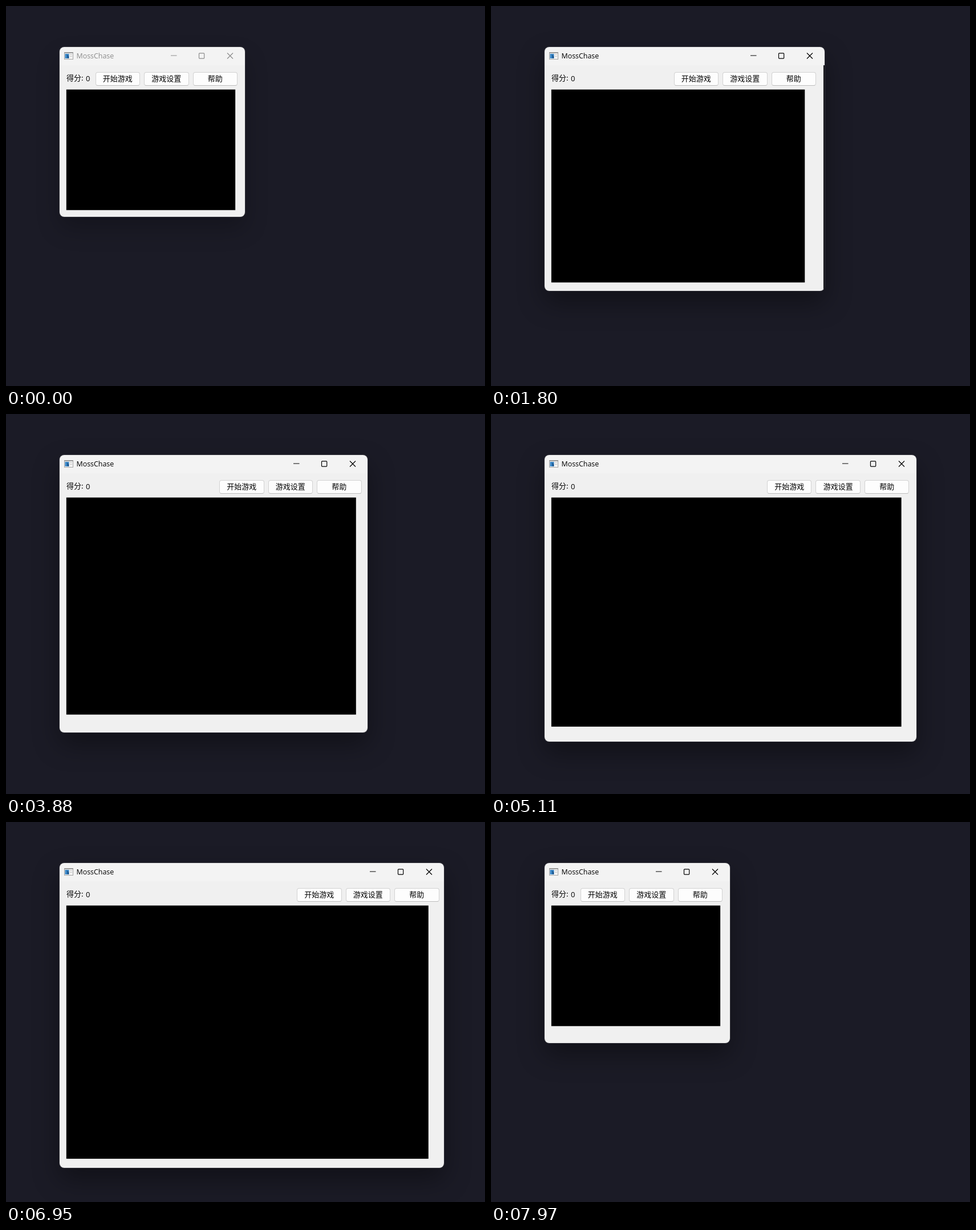
Write an HTML page that moves like this. It is 840x667 px and loops after 8000 ms.

```html
<!DOCTYPE html>
<html lang="zh-CN">
<head>
<meta charset="utf-8">
<title>MossChase</title>
<style>
html, body { margin: 0; width: 100%; height: 100%; overflow: hidden; background: #1b1b26; }
#stage { position: relative; width: 840px; height: 667px; overflow: hidden; }
#stage div, #stage svg { position: absolute; box-sizing: border-box; }
#win {
  left: 94px; top: 72px; border-radius: 8px; overflow: hidden; background: #15151a;
  box-shadow: 0 0 0 1px rgba(70, 70, 78, .55), 0 20px 46px rgba(0, 0, 0, .38);
  font: 13px/24px "Noto Sans CJK SC", "Noto Sans CJK", sans-serif; color: #000;
}
#win.idle { box-shadow: 0 0 0 1px rgba(70, 70, 78, .55), 0 20px 40px rgba(0, 0, 0, .24); }
#bar { left: 0; top: 0; width: 100%; height: 32px; background: #f3f3f3; }
#name { left: 29.5px; top: 4px; font: 12.4px/24px "Open Sans", "Noto Sans", sans-serif; }
.idle #name, .idle #ctl { color: #8c8c8c; }
#icon { left: 8px; top: 8px; }
#ctl { right: 20px; top: 9px; }
#body { left: 0; top: 32px; background: #f0f0f0; overflow: hidden; }
#score { left: 12px; top: 10px; white-space: nowrap; }
#points { left: 46px; top: 11px; font-family: "Open Sans", "Noto Sans", sans-serif; }
.btn {
  top: 12px; width: 78.5px; height: 24px; line-height: 20px; text-align: center;
  background: #fdfdfd; border: 1px solid #d2d2d2; border-bottom-color: #bcbcbc; border-radius: 4px;
}
#view { left: 0; top: 0; width: 100%; height: 100%; }
</style>
</head>
<body>
<div id="stage">
  <div id="win">
    <div id="bar">
      <svg id="icon" width="17" height="15">
        <rect x=".5" y="1.5" width="15" height="12" fill="#f4f4f4" stroke="#a4a4a4"/>
        <path d="M0 2H16" stroke="#999" stroke-width="2"/>
        <rect x="1.5" y="4" width="7" height="8" fill="#3a86c6"/>
        <path d="M5 5L8 8V12H6Z" fill="#174f86"/>
        <path d="M10 5.5H14M10 8.5H14" stroke="#c4c4c4"/>
      </svg>
      <div id="name">MossChase</div>
      <svg id="ctl" width="111" height="13" fill="none" stroke="currentColor" stroke-width="1.2">
        <path d="M1 6H11.5M100 1.5L110 11.5M110 1.5L100 11.5"/>
        <rect x="50.5" y="1.9" width="9.2" height="9.2" rx="1"/>
      </svg>
    </div>
    <div id="body">
      <svg id="view"><rect id="board" x="11.8" y="42.6"/></svg>
      <div id="score">得分:</div>
      <div id="points">0</div>
      <div id="tools">
        <div class="btn" style="right:171px">开始游戏</div>
        <div class="btn" style="right:85.5px">游戏设置</div>
        <div class="btn" style="right:0">帮助</div>
      </div>
    </div>
  </div>
</div>
<script>
const LOOP = 8000, LEFT = 94, TOP = 72, CELL = 127 / 6, TICK = 72;
const REST = [419, 370];

const linear = k => k;
const out = k => 1 - (1 - k) ** 2;
const backIn = k => k * k * (2.9 * k - 1.9);

// drag bursts: first step, last step, steps, right and bottom edge reached
const bursts = [
  [1250, 1795, 9, 585, 500, linear],
  [1864, 2000, 3, 638, 532, linear],
  [2070, 2270, 4, 676, 549, linear],
  [2660, 3000, 6, 687, 526.5, out],
  [3210, 3490, 5, 692, 558.5, linear],
  [3660, 4150, 8, 614, 558.5, out],
  [4300, 5040, 12, 743, 571.5, linear],
  [5110, 5910, 12, 784, 611, linear],
  [5980, 6200, 4, 784, 614, linear],
  [6390, 7150, 11, 636, 552, backIn],
  [7220, 7970, 12, 419, 388, out]
];

const $ = id => document.getElementById(id);
const size = (el, w, h) => { el.style.width = w + 'px'; el.style.height = h + 'px'; };
const cells = room => Math.floor(room / CELL) * CELL;

function edges(t) {
  let at = REST;
  for (const [from, to, n, right, bottom, ease] of bursts) {
    if (t < from) break;
    const step = Math.floor((t - from + 10) / (to - from) * (n - 1)) + 1;
    const k = ease(Math.min(1, step / n));
    at = [at[0] + (right - at[0]) * k, at[1] + (bottom - at[1]) * k];
    if (step < n) break;
  }
  return at;
}

// whole pixels by which the contents trail the frame
const lag = d => Math.trunc(d * (d > 0 ? 0.12 : 0.3));

function draw(t) {
  const [right, bottom] = edges(t), [r0, b0] = edges(t - TICK);
  const w = right - LEFT, h = bottom - TOP;
  const lw = w - lag(right - r0), lh = h - lag(bottom - b0);
  $('win').className = t < 70 ? 'idle' : '';
  size($('win'), w, h);
  size($('body'), lw, h - 32);
  size($('tools'), lw - 13, 0);
  $('board').setAttribute('width', cells(lw - 24.5));
  $('board').setAttribute('height', cells(lh - 86));
}

const start = performance.now();
function frame() {
  draw((performance.now() - start) % LOOP);
  requestAnimationFrame(frame);
}
frame();
</script>
</body>
</html>
```
